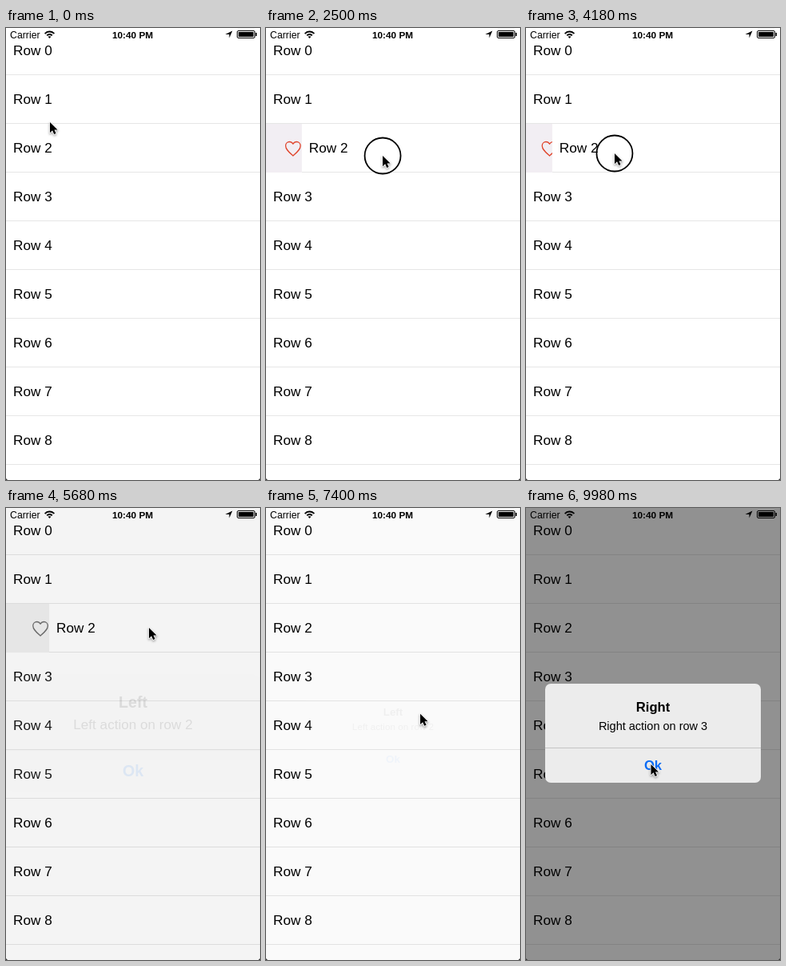
An HTML page with a canvas for the animation above (10 s loop, 318 by 566 pixels).

```html
<!DOCTYPE html>
<html lang="en">
<head>
<meta charset="utf-8">
<title>Swipe actions</title>
<style>
html, body { margin: 0; height: 100%; overflow: hidden; background: #fff; }
canvas { display: block; }
</style>
</head>
<body>
<canvas id="stage" width="318" height="566"></canvas>
<script>
const W = 318, H = 566, ROW = 61, LOOP = 10000;
const c = document.getElementById('stage').getContext('2d');
const FONT = '"Liberation Sans", Arial, sans-serif';
const RED = '#e0452c';

// Pointer path: time, x, y
const path = [
  [0, 55, 118], [560, 35, 153], [700, 35, 157], [900, 35, 157],
  [1900, 105, 159], [2500, 146, 160], [2920, 194, 159], [3200, 203, 158],
  [3940, 148, 158], [4180, 111, 157], [4450, 95, 156], [4960, 125, 154],
  [5420, 179, 150], [5680, 179, 150], [6500, 158, 322], [7080, 158, 322],
  [7400, 193, 258], [7700, 227, 224], [7840, 227, 224], [8540, 69, 223],
  [8680, 62, 223], [9000, 62, 223], [9960, 157, 321], [10000, 156, 321]
];

const swipes = [
  { row: 2, side: 1, from: 900, to: 5600, x0: 34, limit: 225, close: 7050, title: 'Left' },
  { row: 3, side: -1, from: 7840, to: 8960, x0: 230, limit: 260, close: Infinity, title: 'Right' }
];

function ease(t, start, length) {
  const p = Math.min(1, Math.max(0, (t - start) / length));
  return p * p * (3 - 2 * p);
}

function slope(i, k) {
  return (path[i + 1][k] - path[i][k]) / (path[i + 1][0] - path[i][0]);
}

function tangent(i, k) {
  if (i === 0 || i === path.length - 1) return 0;
  const a = slope(i - 1, k), b = slope(i, k);
  return a * b > 0 ? 2 * a * b / (a + b) : 0;
}

// Monotone cubic through the path points
function pointer(t) {
  let i = 0;
  while (i < path.length - 2 && t >= path[i + 1][0]) i++;
  const span = path[i + 1][0] - path[i][0], u = (t - path[i][0]) / span;
  return [1, 2].map(k => {
    const s = u * u * (3 - 2 * u);
    return path[i][k] * (1 - s) + path[i + 1][k] * s +
      span * u * (1 - u) * ((1 - u) * tangent(i, k) - u * tangent(i + 1, k));
  });
}

// Rubber-band distance of a swiped row
function pull(s, t) {
  if (t < s.from) return 0;
  const x = Math.max(0, s.side * (pointer(Math.min(t, s.to))[0] - s.x0));
  return x * s.limit / (x + 2 * s.limit) * (1 - ease(t, s.to + 60, 300));
}

function text(str, x, y, size, color = '#000', bold = false, align = 'left') {
  c.font = (bold ? 'bold ' : '') + size + 'px ' + FONT;
  c.textAlign = align;
  c.fillStyle = color;
  c.fillText(str, x, y);
}

function rect(x, y, w, h, color) {
  c.fillStyle = color;
  c.fillRect(x, y, w, h);
}

function shape(d, x, y, fill, stroke, width = 1) {
  const p = new Path2D(d);
  c.save();
  c.translate(x, y);
  if (stroke) {
    c.strokeStyle = stroke;
    c.lineWidth = width;
    c.lineJoin = 'round';
    c.stroke(p);
  }
  if (fill) {
    c.fillStyle = fill;
    c.fill(p);
  }
  c.restore();
}

const HEART = 'M10 18.5C5 14 .7 10.5 .7 6C.7 3 3 1 5.5 1C7.5 1 9 2 10 3.8C11 2 12.5 1 14.5 1C17 1 19.3 3 19.3 6C19.3 10.5 15 14 10 18.5Z';
const TRASH = 'M0 4.5H19M5.5 4.5C5.5 2 6 .7 7.5 .7H11.5C13 .7 13.5 2 13.5 4.5M1.8 4.5L3.6 25.3H15.4L17.2 4.5M6 8L6.7 22M9.5 8V22M13 8L12.3 22';
const ARROW = 'M0 0V13.2L3.1 10.3L5.2 15L7.6 14L5.5 9.4H9.6Z';

function drawRow(n, t) {
  const top = n * ROW - 2, s = swipes.find(s => s.row === n);
  const d = s ? pull(s, t) : 0;
  c.save();
  if (d > 0.1) {
    const grey = t >= s.to, color = grey ? '#6c6c6c' : RED;
    const left = s.side > 0;
    rect(left ? 0 : W - d, top, d, ROW, grey ? '#f0f0f0' : '#f2eef3');
    c.beginPath();
    c.rect(left ? 0 : W - d, top, d, ROW);
    c.save();
    c.clip();
    if (left) shape(HEART, Math.max(19.5, d - 21), top + 21.5, null, color, 1.3);
    else shape(TRASH, Math.min(279, W - d + 1.5), top + 18, null, color, 1.3);
    c.restore();
    c.translate(s.side * d, 0);
    c.beginPath();
    c.rect(0, top, W, ROW);
    c.clip();
  }
  rect(0, top + 60, W, 1, '#e6e6e6');
  text('Row ' + n, 9, top + 36, 17.2);
  c.restore();
}

function drawStatus() {
  text('Carrier', 5, 12.5, 12.3);
  text('10:40 PM', 158.5, 12.5, 11.8, '#000', true, 'center');
  c.strokeStyle = '#000';
  c.lineWidth = 1.8;
  for (const r of [4.5, 8]) {
    c.beginPath();
    c.arc(54.5, 12.5, r, -Math.PI * 0.76, -Math.PI * 0.24);
    c.stroke();
  }
  shape('M0 0L-2 -2.2Q0 -3.5 2 -2.2Z', 54.5, 13, '#000');
  shape('M9 0L5 9V4.5H0Z', 274.5, 3.5, '#000');
  c.lineWidth = 1;
  c.beginPath();
  c.roundRect(289.5, 3.5, 22, 9, 1.5);
  c.stroke();
  rect(291, 5, 19, 6, '#000');
  rect(312.5, 6, 1.5, 4, '#000');
}

function drawAlert(s, t) {
  const closing = ease(t, s.close, 400);
  const show = ease(t, s.to, 420) * (1 - closing);
  if (show <= 0) return;
  const scale = t < s.close ? 1.2 - 0.2 * show : 1 - 0.2 * closing;
  rect(0, 0, W, H, `rgba(0,0,0,${0.43 * show})`);
  c.save();
  c.globalAlpha = show;
  c.translate(159, 282);
  c.scale(scale, scale);
  c.beginPath();
  c.roundRect(-135, -62, 270, 124, 7);
  c.fillStyle = '#ececec';
  c.fill();
  rect(-135, 18, 270, 1, '#c4c4c4');
  text(s.title, 0, -27, 16.6, '#000', true, 'center');
  text(`${s.title} action on row ${s.row}`, 0, -4.5, 14.5, '#000', false, 'center');
  text('Ok', 0, 46, 16.6, '#0b6cf5', true, 'center');
  c.restore();
}

function drawPointer(t) {
  const [x, y] = pointer(t);
  if (swipes.some(s => t >= s.from && t < s.to)) {
    c.strokeStyle = '#000';
    c.lineWidth = 1.8;
    c.beginPath();
    c.arc(x, y, 22.5, 0, 2 * Math.PI);
    c.stroke();
  }
  c.save();
  c.shadowColor = 'rgba(0,0,0,0.4)';
  c.shadowBlur = 3;
  c.shadowOffsetY = 1.5;
  shape(ARROW, x, y, null, '#fff', 1.6);
  c.restore();
  shape(ARROW, x, y, '#000');
}

function frame(now) {
  const t = now % LOOP;
  rect(0, 0, W, H, '#fff');
  for (let n = 0; n < 9; n++) drawRow(n, t);
  drawStatus();
  for (const s of swipes) drawAlert(s, t);
  shape('M0 0V-2L2 0Z', 0, H, '#333');
  shape('M0 0V-2L-2 0Z', W, H, '#333');
  drawPointer(t);
}

const start = performance.now();
function loop() {
  frame(performance.now() - start);
  requestAnimationFrame(loop);
}
loop();
</script>
</body>
</html>
```
